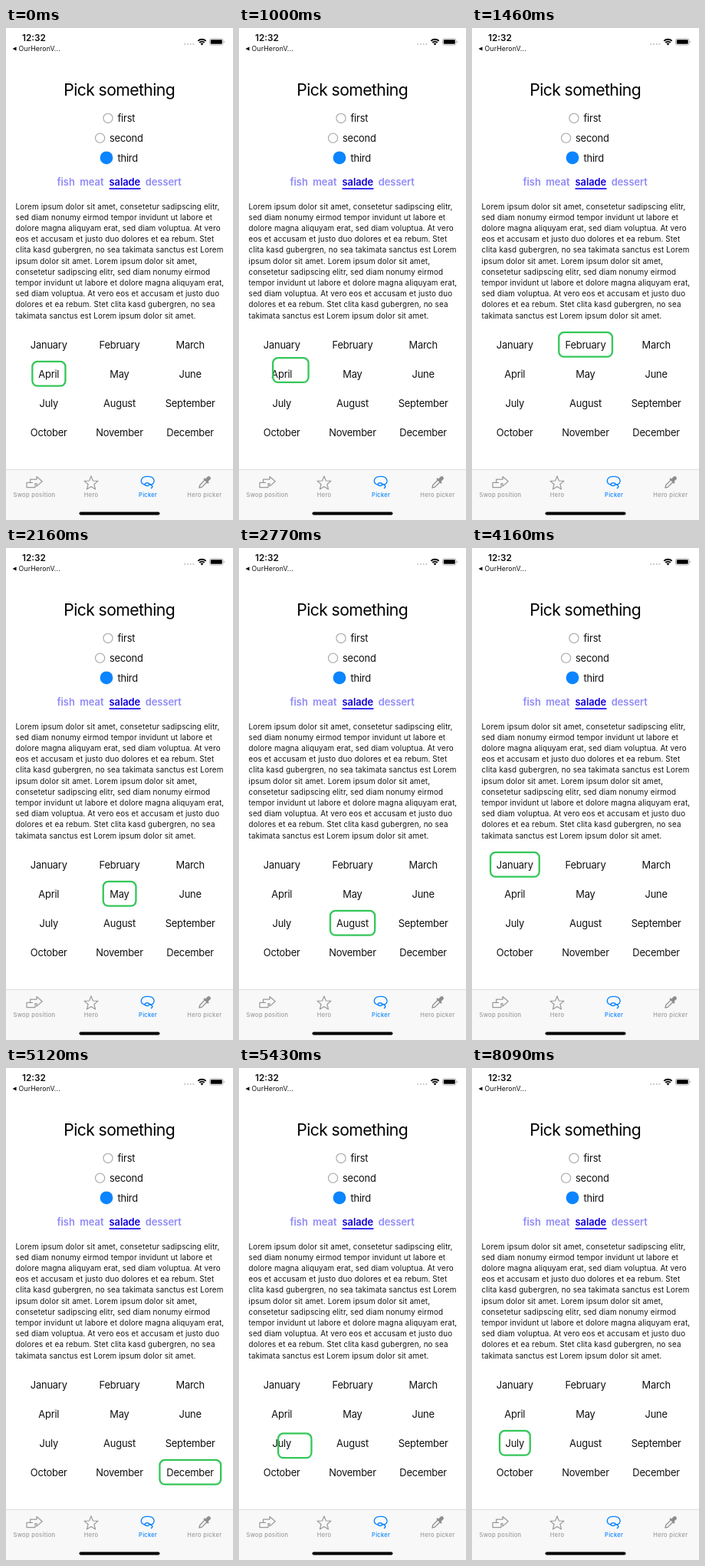
Recreate the animation shown at these times as an HTML page. Size 296 px wide and 640 px high, loop 8120 ms.

```html
<!DOCTYPE html>
<html lang="en">
<head>
<meta charset="utf-8">
<title>Pick something</title>
<style>
  html, body { margin: 0; width: 100%; height: 100%; overflow: hidden; background: #fff; }
  svg { display: block; width: 296px; height: 640px; }
  text { font-family: Inter, Roboto, sans-serif; white-space: pre; }
  .line { fill: none; stroke-linecap: round; stroke-linejoin: round; }
</style>
</head>
<body>
<svg id="stage" viewBox="0 0 296 640">
  <!-- status bar -->
  <path d="M8.5 27 L13.5 24.4 V29.6 Z"/>
  <g fill="#c4c4c4">
    <circle cx="233.3" cy="21" r="1.1"/><circle cx="237" cy="21" r="1.1"/>
    <circle cx="240.7" cy="21" r="1.1"/><circle cx="244.4" cy="21" r="1.1"/>
  </g>
  <g class="line" stroke="#000" stroke-width="1.8" style="stroke-linecap:butt">
    <path d="M250.3 16.9 A7.4 7.4 0 0 1 260.7 16.9"/>
    <path d="M252.3 19 A4.5 4.5 0 0 1 258.7 19"/>
  </g>
  <path d="M255.5 22.4 L253.6 20.5 A2.7 2.7 0 0 1 257.4 20.5 Z"/>
  <rect x="265.5" y="13.9" width="17.6" height="8.2" rx="2.4" fill="none" stroke="#a0a0a0" stroke-width=".8"/>
  <rect x="266.8" y="15.2" width="15" height="5.6" rx="1.3"/>
  <path d="M284.1 16.6 A1.6 1.6 0 0 1 284.1 19.5 Z" fill="#a0a0a0"/>

  <!-- radio buttons -->
  <g fill="#fff" stroke="#a6a6a6" stroke-width="1.1">
    <circle cx="133" cy="117.3" r="6.1"/><circle cx="122.6" cy="143.1" r="6.1"/>
  </g>
  <circle cx="131" cy="168.8" r="8.4" fill="#0a84ff"/>
  <rect x="134.5" y="208.2" width="41" height="1.6" fill="#1000f0"/>

  <!-- tab bar -->
  <rect y="574" width="296" height="66" fill="#f8f8f8"/>
  <rect y="574" width="296" height=".6" fill="#cfcfcf"/>
  <g class="line" stroke="#999" stroke-width="1.2">
    <path d="M31.6 591.4 V587.2 H40 V583.5 L47.2 589.8 L40 596.1 V592.6 H38 V597.6 H27 V591.4 H34.5"/>
    <path id="star"/>
  </g>
  <g class="line" stroke="#0a84ff" stroke-width="1.4">
    <path d="M181.2 594.3 C173.6 592 175 583.4 184.6 583.4 C194.8 583.4 195.4 592.6 188.6 594.3"/>
    <ellipse cx="184" cy="593.6" rx="2.8" ry="1.9"/>
    <path d="M186.7 593 C190.2 594 192.4 596.6 189.4 598.6"/>
  </g>
  <g transform="translate(258.7 591.3) rotate(45)" fill="#8e8e8e">
    <rect x="-2.5" y="-10.6" width="5" height="7.4" rx="2.4"/>
    <rect x="-4.4" y="-4.4" width="8.8" height="2.2" rx="1"/>
    <path class="line" d="M-1.9 -2 V6.4 L0 9.6 L1.9 6.4 V-2" stroke="#8e8e8e" stroke-width="1.2"/>
  </g>
  <rect x="95.5" y="629.6" width="105" height="3.9" rx="1.95"/>
</svg>
<script>
const NS = "http://www.w3.org/2000/svg";
const stage = document.getElementById("stage");

function add(tag, attrs, content = "") {
  const el = document.createElementNS(NS, tag);
  for (const k in attrs) el.setAttribute(k, attrs[k]);
  el.textContent = content;
  return stage.appendChild(el);
}

function label(str, x, y, size, { gap = 0, weight = 400, fill = "#111", mid = false } = {}) {
  add("text", {
    x: mid ? x + gap / 2 : x, y, fill, "font-size": size, "font-weight": weight,
    "letter-spacing": gap, "text-anchor": mid ? "middle" : "start"
  }, str);
}

label("12:32", 21, 17, 11.8, { weight: 600 });
label("OurHeronV...", 16.5, 30, 8.8, { gap: .1 });
label("Pick something", 148, 88, 21.2, { mid: true, gap: -.6, fill: "#000" });

label("first", 145.5, 122, 12.9, { gap: -.2 });
label("second", 135, 148, 12.9, { gap: -.2 });
label("third", 145.5, 173.5, 12.9, { gap: -.2 });

const faded = "#908af6";
[["fish", 66.5], ["meat", 96.3], ["salade", 134.5, "#1000d8"], ["dessert", 181.8]].forEach(
  ([s, x, fill = faded]) => label(s, x, 205, 12.9, { weight: 600, gap: -.05, fill }));

[
  "Lorem ipsum dolor sit amet, consetetur sadipscing elitr,",
  "sed diam nonumy eirmod tempor invidunt ut labore et",
  "dolore magna aliquyam erat, sed diam voluptua. At vero",
  "eos et accusam et justo duo dolores et ea rebum. Stet",
  "clita kasd gubergren, no sea takimata sanctus est Lorem",
  "ipsum dolor sit amet. Lorem ipsum dolor sit amet,",
  "consetetur sadipscing elitr, sed diam nonumy eirmod",
  "tempor invidunt ut labore et dolore magna aliquyam erat,",
  "sed diam voluptua. At vero eos et accusam et justo duo",
  "dolores et ea rebum. Stet clita kasd gubergren, no sea",
  "takimata sanctus est Lorem ipsum dolor sit amet."
].forEach((s, i) => label(s, 12.6, 235.6 + i * 14.2, 9.9, { gap: .14 }));

const colX = i => 55.9 + 92.2 * (i % 3);
const rowY = i => 411.8 + 38 * Math.floor(i / 3);
"January February March April May June July August September October November December"
  .split(" ").forEach((s, i) => label(s, colX(i), rowY(i) + 4.7, 12.9, { mid: true, gap: -.2 }));

[["Swop position", 36.8], ["Hero", 111], ["Picker", 185, "#0a84ff"], ["Hero picker", 258.7]].forEach(
  ([s, x, fill = "#9a9a9a"]) => label(s, x, 610, 7.5, { mid: true, weight: 500, gap: .33, fill }));

const star = Array.from({ length: 10 }, (_, i) => {
  const r = i % 2 ? 4.1 : 9.4, a = i * Math.PI / 5;
  return [111 + r * Math.sin(a), 592.3 - r * Math.cos(a)].map(v => v.toFixed(2));
});
document.getElementById("star").setAttribute("d", "M" + star.join("L") + "Z");

// Selection frame: month index and width
const frame = add("rect", { fill: "none", stroke: "#34c759", "stroke-width": 2.3, rx: 6.6 });
const spot = (month, w) => [colX(month), rowY(month), w];
const april = spot(3, 45.4);
const moves = [
  { at: 880, gap: 120, end: 1220, to: spot(1, 72) },
  { at: 1460, gap: 120, end: 1780, to: spot(4, 45) },
  { at: 2160, gap: 100, end: 2460, to: spot(7, 60.5) },
  { at: 2770, gap: 110, end: 3100, to: april },
  { at: 3270, gap: 110, end: 3590, to: spot(0, 66) },
  { at: 4160, gap: 110, end: 4470, to: spot(11, 82) },
  { at: 5120, gap: 110, end: 5430, to: spot(6, 42) }
];
const LOOP = 8120, SETTLE = 8090, DELAY = 34, SPAN = 350;

// Ease-in-out, cubic-bezier(.42, 0, .58, 1)
function ease(x) {
  if (x <= 0) return 0;
  if (x >= 1) return 1;
  let lo = 0, hi = 1;
  for (let i = 0; i < 24; i++) {
    const u = (lo + hi) / 2, v = 1 - u;
    if (1.26 * u * v * v + 1.74 * u * u * v + u ** 3 < x) lo = u; else hi = u;
  }
  return lo * lo * (3 - 2 * lo);
}

function pose(t) {
  const n = moves.findLastIndex(m => t >= m.at);
  if (n < 0) return april;
  const { at, gap, end, to } = moves[n];
  if (t >= SETTLE) return to;
  const from = n ? moves[n - 1].to : april;
  // The screen refreshes four times per move and keeps the last picture.
  const ticks = [at, at + gap, (at + gap + end) / 2, end];
  const p = ease((ticks.findLast(s => t >= s) - at - DELAY) / SPAN);
  return from.map((v, i) => v + (to[i] - v) * p);
}

const start = performance.now();
function draw() {
  const [x, y, w] = pose((performance.now() - start) % LOOP);
  const box = { x: x - w / 2 + 1.15, y: y - 15.85, width: w - 2.3, height: 31.7 };
  for (const k in box) frame.setAttribute(k, box[k]);
  requestAnimationFrame(draw);
}
draw();
</script>
</body>
</html>
```
